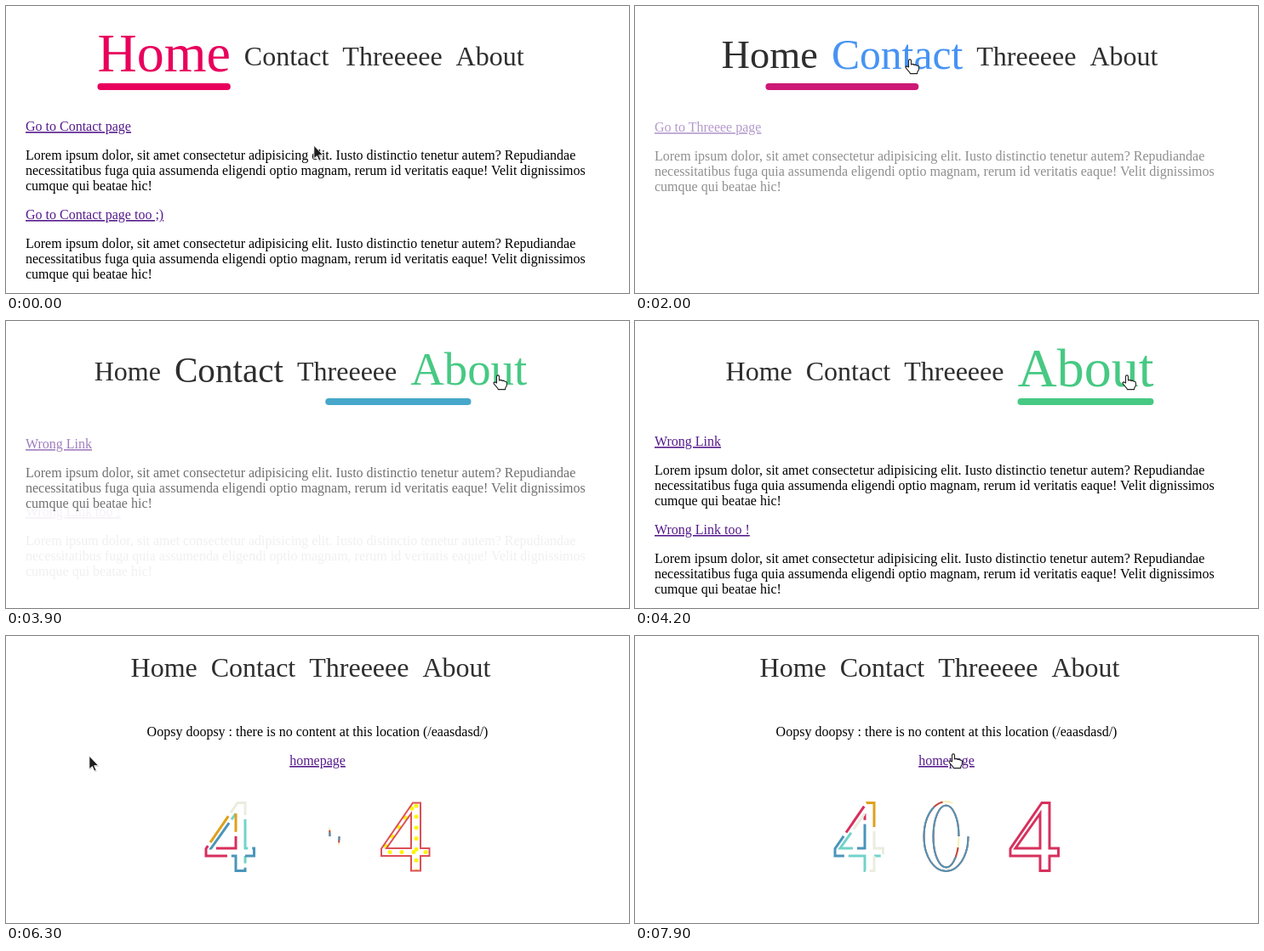
Recreate the animation shown at these times as an HTML page. Size 732x338 px, loop 8 s.

```html
<!DOCTYPE html>
<html lang="en">
<head>
<meta charset="utf-8">
<title>Animated navigation</title>
<style>
html, body { margin: 0; width: 100%; height: 100%; overflow: hidden; background: #fff; }
svg { display: block; width: 732px; height: 338px; font-family: "Liberation Serif", "Times New Roman", serif; font-size: 16px; }
.link { fill: #551a8b; text-decoration: underline; }
</style>
</head>
<body>
<svg id="stage" viewBox="0 0 732 338"></svg>
<script>
const LOOP = 8000, STEP = 100;
const CENTER = 366, MARGIN = 16, SMALL = 32, BIG = 64;
const DARK = 'rgb(46,46,46)';
const items = [
  { label: 'Home', color: [232, 0, 92] },
  { label: 'Contact', color: [70, 147, 243] },
  { label: 'Threeeee', color: [240, 170, 40] },
  { label: 'About', color: [71, 201, 131] }
];
const lorem = [
  'Lorem ipsum dolor, sit amet consectetur adipisicing elit. Iusto distinctio tenetur autem? Repudiandae',
  'necessitatibus fuga quia assumenda eligendi optio magnam, rerum id veritatis eaque! Velit dignissimos',
  'cumque qui beatae hic!'
];
// at: when the page is swapped; start: zero point of its layout motion
const pages = [
  { at: 0, start: -2000, active: 0, links: ['Go to Contact page', 'Go to Contact page too ;)'] },
  { at: 2000, start: 1851, active: 1, links: ['Go to Threeee page', 'Go to Threeee page too ;)'] },
  { at: 3800, start: 3715, active: 3, links: ['Wrong Link', 'Wrong Link too !'] },
  { at: 5800, start: 5814, active: -1, links: [] }
];
const home = { x: 361, y: 163 };
const moves = [
  { from: 400, to: 900, x: 559, y: 65 },
  { from: 1200, to: 1400, x: 434, y: 63 },
  { from: 1500, to: 1700, x: 323, y: 63 },
  { from: 2100, to: 2500, x: 460, y: 80 },
  { from: 2600, to: 2900, x: 578, y: 64 },
  { from: 4600, to: 4800, x: 540, y: 64 },
  { from: 4900, to: 5500, x: 97, y: 140 },
  { from: 7000, to: 7800, x: 374, y: 139 }
];
const FOUR = 'M281 259V276.5H270V259H235V250.5L272 196.5H281V250H291.5V259ZM270 209L241 250H270Z';
const DASH = 37.5, UNIT = 42.4, DASH_SPEED = 35.3;
const dashColors = ['#72d3c9', '#4a95ba', '#d72f5d', '#e0a01c', '#eaeddf'];
const zeroColors = ['#f4f0b8', '#c24444', '#4f96ba'];

const stage = document.getElementById('stage');
const clamp = v => Math.max(0, Math.min(1, v));
const mix = (a, b, k) => a + (b - a) * k;
const smooth = k => k * k * (3 - 2 * k);
const rgb = (a, b = a, k = 0) => `rgb(${a.map((v, i) => Math.round(mix(v, b[i], k)))})`;
const show = (el, on) => { el.style.display = on ? '' : 'none'; };

function set(el, attrs) {
  for (const key in attrs) el.setAttribute(key, attrs[key]);
}
function add(parent, tag, attrs = {}, text = '') {
  const el = document.createElementNS('http://www.w3.org/2000/svg', tag);
  set(el, attrs);
  el.textContent = text;
  return parent.appendChild(el);
}

// cubic-bezier(.4, 0, .1, 1)
function ease(x) {
  let lo = 0, hi = 1;
  for (let i = 0; i < 24; i++) {
    const s = (lo + hi) / 2, r = 1 - s;
    if (1.2 * r * r * s + 0.3 * r * s * s + s * s * s < x) lo = s; else hi = s;
  }
  return smooth(lo);
}
// Underdamped spring from 1 to 0
function spring(ms) {
  const s = Math.max(0, ms) / 1000, w = 18.5 * s;
  return Math.exp(-12.5 * s) * (Math.cos(w) + 0.676 * Math.sin(w));
}

// Ring drawn from its rightmost point; dir 1 is clockwise
function ring(rx, ry, dir) {
  const cx = 365.5, cy = 236, hx = rx * 0.52, hy = ry * 0.6 * dir, v = ry * dir;
  return `M${cx + rx} ${cy}c0 ${hy} ${hx - rx} ${v} ${-rx} ${v}s${-rx} ${hy - v} ${-rx} ${-v}` +
    `s${rx - hx} ${-v} ${rx} ${-v}s${rx} ${v - hy} ${rx} ${v}`;
}

function layout(active) {
  const sizes = items.map((_, i) => i === active ? BIG : SMALL);
  const total = items.reduce((sum, it, i) => sum + it.em * sizes[i] + MARGIN, 0);
  let x = CENTER - total / 2;
  return items.map((it, i) => {
    const box = { x, size: sizes[i], width: it.em * sizes[i], y: active < 0 ? 48 : i === active ? 77 : 70 };
    x += box.width + MARGIN;
    return box;
  });
}

const labels = items.map(it => {
  const el = add(stage, 'text', { 'font-size': 100 }, it.label);
  it.em = el.getComputedTextLength() / 100;
  return el;
});
const bar = add(stage, 'rect', { y: 91, height: 8, rx: 4 });

pages.forEach(page => {
  page.boxes = layout(page.active);
  page.root = add(stage, 'g');
  page.groups = page.links.map((link, n) => {
    const g = add(page.root, 'g'), top = 147 + 104 * n;
    add(g, 'text', { x: 23, y: top, class: 'link' }, link);
    lorem.forEach((line, i) => add(g, 'text', { x: 23, y: top + 34 + 18 * i }, line));
    return g;
  });
});

const lostPage = pages[pages.length - 1];
const lost = add(lostPage.root, 'g');
lostPage.groups.push(lost);
add(lost, 'text', { x: CENTER, y: 118, 'text-anchor': 'middle' },
  'Oopsy doopsy : there is no content at this location (/eaasdasd/)');
add(lost, 'text', { x: CENTER, y: 152, 'text-anchor': 'middle', class: 'link' }, 'homepage');

const dashes = dashColors.map(stroke => add(lost, 'path',
  { d: FOUR, fill: 'none', stroke, 'stroke-width': 3, 'stroke-dasharray': `${DASH} ${5 * UNIT - DASH}` }));
const rings = zeroColors.map(stroke => add(lost, 'path',
  { d: ring(26, 41, 1) + ring(15, 36.5, -1), fill: 'none', stroke, 'stroke-width': 2 }));

const clip = add(add(stage, 'defs'), 'clipPath', { id: 'four' });
add(clip, 'path', { d: FOUR, 'clip-rule': 'evenodd' });
const dotted = add(lost, 'g', { transform: 'translate(206)' });
const spots = add(dotted, 'g', { 'clip-path': 'url(#four)', fill: '#fff30f' });
const outline = add(dotted, 'path', { d: FOUR, fill: 'none' });

// Even dots along one stroke of the digit
function dotLine(x1, y1, x2, y2) {
  const n = Math.round(Math.hypot(x2 - x1, y2 - y1) / 13);
  for (let i = 0; i <= n; i++) add(spots, 'circle', { cx: mix(x1, x2, i / n), cy: mix(y1, y2, i / n) });
}
dotLine(276, 200, 276, 277);
dotLine(271, 203, 240, 247);
dotLine(245, 254.5, 287, 254.5);

const cursor = add(stage, 'g');
const ARROW = 'M0 0V15.6L3.6 12.4L6 18L8.3 17L5.9 11.5H11Z';
const arrow = add(cursor, 'g', { transform: 'translate(.8 1.2)' });
add(arrow, 'path', { d: ARROW, transform: 'translate(.8 1)', fill: '#000', opacity: 0.2 });
add(arrow, 'path', { d: ARROW, fill: '#1d1d1d', stroke: '#fff', 'stroke-width': 0.9 });
const hand = add(cursor, 'path', {
  d: 'M4.5 10V2.4a1.5 1.5 0 0 1 3 0V7l1.2-.6 1.7.2.5.8 2-.3 1 1 1.5.1 1 1.2V13l-1.7 3v1.6H6.5L5 15.3 1.2 10.8 1 9.3 2.5 8.9z',
  transform: 'translate(-6 -1)', fill: '#fff', stroke: '#222', 'stroke-width': 1.1, 'stroke-linejoin': 'round'
});

function drawNav(t, page, prev) {
  const p = ease(clamp((t - page.start) / 450));
  const between = (i, key) => mix(prev.boxes[i][key], page.boxes[i][key], p);
  labels.forEach((el, i) => set(el, {
    x: between(i, 'x'), y: between(i, 'y'), 'font-size': between(i, 'size'),
    fill: i === page.active ? rgb(items[i].color) : DARK
  }));
  show(bar, page.active >= 0);
  if (page.active < 0) return;
  const from = prev.boxes[prev.active], to = page.boxes[page.active];
  set(bar, {
    x: mix(from.x, to.x, p), width: mix(from.width, to.width, p),
    fill: rgb(items[prev.active].color, items[page.active].color, p ** 3)
  });
}

function drawContent(t, page) {
  pages.forEach(pg => show(pg.root, pg === page));
  page.groups.forEach((g, n) => {
    const ms = t - page.start - 17 - 150 * n;
    set(g, { opacity: clamp(ms / 300), transform: `translate(0 ${Math.round(-23 * spring(ms))})` });
  });
}

function drawDigits(s) {
  dashes.forEach((el, i) => set(el, { 'stroke-dashoffset': 45.3 - UNIT * i - DASH_SPEED * s }));
  rings.forEach((el, i) => {
    const length = 42.8 * Math.max(0, s - 0.08 * i) ** 1.88;
    set(el, { 'stroke-dasharray': `${length} 400` });
  });
  const k = (1 - Math.cos(Math.PI * s)) / 2;
  for (const dot of spots.children) set(dot, { r: 5.6 * k });
  set(outline, { stroke: rgb([215, 47, 93], [226, 120, 80], k), 'stroke-width': mix(3, 0.8, k) });
}

function overLink(page, x, y) {
  const onNav = page.boxes.some(b =>
    x > b.x && x < b.x + b.width && y > b.y - 0.92 * b.size && y < b.y + 0.24 * b.size);
  return onNav || [...page.root.querySelectorAll('.link')].some(el => {
    const b = el.getBBox();
    return x > b.x && x < b.x + b.width && y > b.y && y < b.y + b.height;
  });
}

function drawCursor(t, page) {
  let { x, y } = home;
  for (const m of moves) {
    const k = smooth(clamp((t - m.from) / (m.to - m.from)));
    x = mix(x, m.x, k);
    y = mix(y, m.y, k);
  }
  const pointing = overLink(page, x, y);
  set(cursor, { transform: `translate(${Math.round(x)} ${Math.round(y)})` });
  show(arrow, !pointing);
  show(hand, pointing);
}

function draw(ms) {
  const t = Math.floor((ms % LOOP) / STEP) * STEP;
  const n = pages.filter(pg => pg.at <= t).length - 1, page = pages[n];
  drawNav(t, page, pages[Math.max(0, n - 1)]);
  drawContent(t, page);
  if (page === lostPage) drawDigits((t - page.start - 17) / 1000);
  drawCursor(t, page);
}

const begin = performance.now();
function tick() {
  draw(performance.now() - begin);
  requestAnimationFrame(tick);
}
tick();
</script>
</body>
</html>
```
